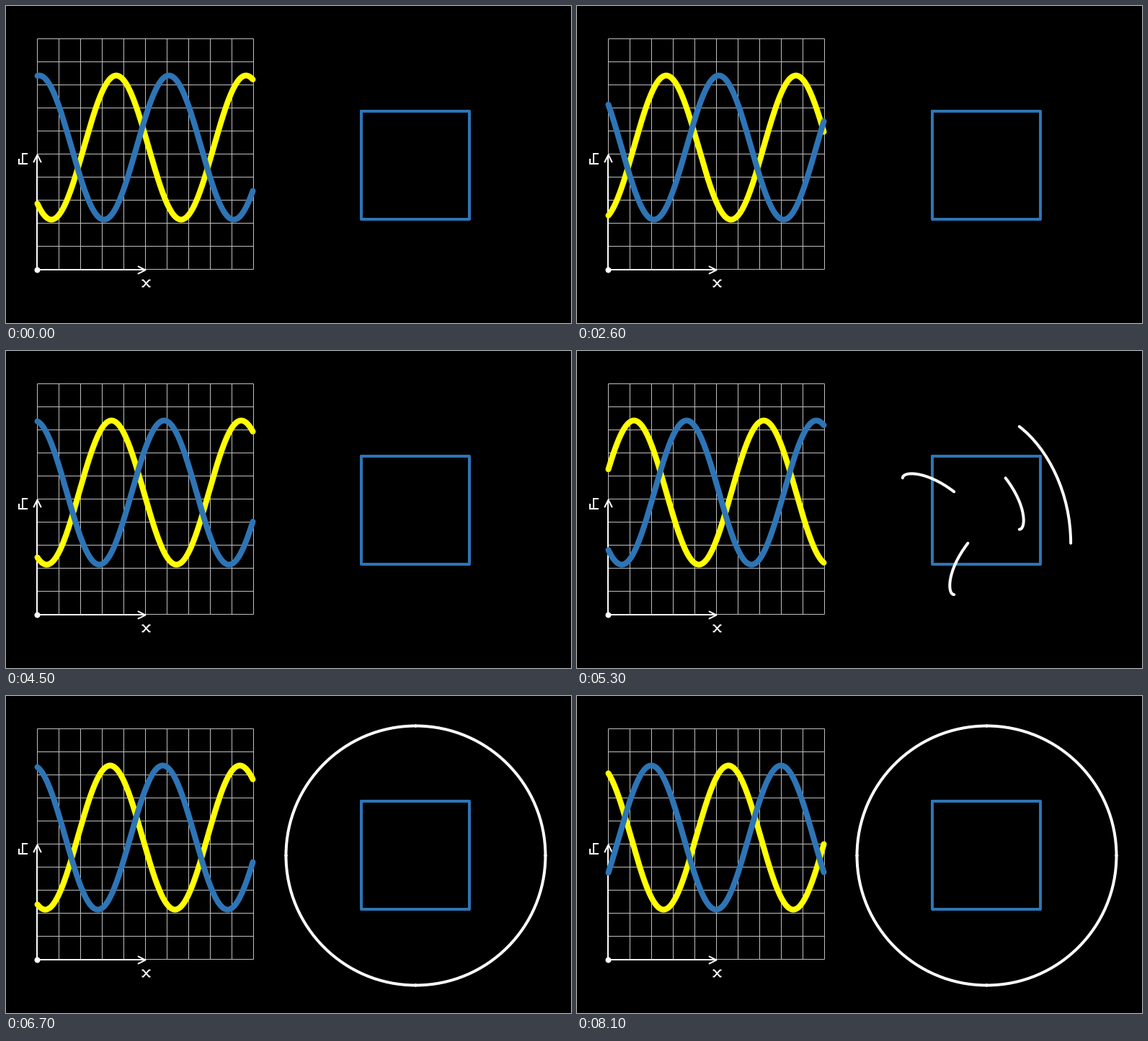
These frames come from a looping animation (784 by 440 pixels, 8200 ms). A matplotlib script:

```python
import numpy as np
import matplotlib.pyplot as plt
from matplotlib.animation import FuncAnimation
from matplotlib.patches import PathPatch, Circle
from matplotlib.path import Path

W, H, DPI = 784, 440, 100
FRAMES, INTERVAL = 82, 100
PX = 72 / DPI
BLUE, YELLOW, WHITE, GREY = "#2e75b6", "#ffff00", "#ffffff", "#bebebe"

fig = plt.figure(figsize=(W / DPI, H / DPI), dpi=DPI, facecolor="black")
ax = fig.add_axes([0, 0, 1, 1])
ax.set_xlim(0, W)
ax.set_ylim(H, 0)
ax.axis("off")


def stroke(xs, ys, color, width, z, cap="round", **kw):
    """Polyline through pixel centres, width in pixels."""
    line, = ax.plot(np.asarray(xs) + 0.5, np.asarray(ys) + 0.5, color=color,
                    lw=width * PX, zorder=z, solid_capstyle=cap, **kw)
    return line


# Grid
LEFT, RIGHT, TOP, BOTTOM = 43, 343, 45, 365
for x in range(LEFT, RIGHT + 1, 30):
    stroke([x, x], [TOP, BOTTOM], GREY, 1, 1, "butt")
for y in range(TOP, BOTTOM + 1, 32):
    stroke([LEFT, RIGHT], [y, y], GREY, 1, 1, "butt")

# Axes with arrows and pixel-style labels
stroke([43, 192], [366, 366], WHITE, 2, 2, "butt")
stroke([43, 43], [366, 207], WHITE, 2, 2, "butt")
stroke([183, 193, 183], [361, 366, 371], WHITE, 2, 2)
stroke([38, 43, 48], [216, 206, 216], WHITE, 2, 2)
ax.add_patch(Circle((43.5, 366.5), 4, color=WHITE, lw=0, zorder=2))

LABELS = [
    ([188, 190, 198, 200], [380, 380, 389, 389]),
    ([200, 198, 190, 188], [380, 380, 389, 389]),
    ([18, 18, 30], [212, 219, 219]),
    ([30, 23, 23], [205, 205, 219]),
]
for xs, ys in LABELS:
    stroke(xs, ys, WHITE, 2, 2, "butt", solid_joinstyle="miter")

# Travelling waves
MID, AMP, WAVELENGTH, LAG = 196, 100, 180, 73
wave_x = np.linspace(LEFT, RIGHT - 1, 301)
yellow = stroke(wave_x, wave_x, YELLOW, 8, 5)
blue = stroke(wave_x, wave_x, BLUE, 8, 6)

# Clock-driven travel to the left, in pixels
TRAVEL_FRAMES = [0, 14, 26, 45, 60, 74, 81]
TRAVEL = [0, 110.2, 209.2, 366.6, 492.8, 604.3, 662.9]


def wave(peak):
    return MID + 0.5 - AMP * np.cos(2 * np.pi * (wave_x - peak) / WAVELENGTH)


# Square whose sides bend into the quarters of a circle
CX, CY, HALF, RADIUS, KAPPA = 568, 221, 75, 180, 0.5523
MORPH_START, MORPH_LENGTH = 46.1, 17.4

stroke(CX + HALF * np.array([-1, 1, 1, -1, -1]),
       CY + HALF * np.array([-1, -1, 1, 1, -1]), BLUE, 4, 3,
       solid_joinstyle="round")

# (quarter start, quarter end, side start, side end) as unit directions
PIECES = np.array([
    [(-1, 0), (0, -1), (-1, -1), (-1, 1)],
    [(0, -1), (1, 0), (1, -1), (1, 1)],
    [(1, 0), (0, 1), (-1, -1), (1, -1)],
    [(0, 1), (-1, 0), (-1, 1), (1, 1)],
], dtype=float)
CODES = [Path.MOVETO] + [Path.CURVE4] * 3


def morph_path(a):
    points = []
    for q0, q1, s0, s1 in PIECES:
        arc = RADIUS * np.array([q0, q0 + KAPPA * q1, q1 + KAPPA * q0, q1])
        side = HALF * np.array([s0, (2 * s0 + s1) / 3, (s0 + 2 * s1) / 3, s1])
        points.append(a * arc + (1 - a) * side)
    return Path(np.concatenate(points) + [CX + 0.5, CY + 0.5], CODES * 4)


morph = PathPatch(morph_path(0), fill=False, edgecolor=WHITE, lw=4 * PX,
                  capstyle="round", joinstyle="round", zorder=4)
ax.add_patch(morph)


def update(n):
    peak = 152.5 - np.interp(n, TRAVEL_FRAMES, TRAVEL)
    yellow.set_ydata(wave(peak))
    blue.set_ydata(wave(peak + LAG))
    a = (n - MORPH_START) / MORPH_LENGTH
    morph.set_visible(a > 0)
    morph.set_path(morph_path(min(max(a, 0), 1))) if hasattr(morph, "set_path") else None
    return yellow, blue, morph


anim = FuncAnimation(fig, update, frames=FRAMES, interval=INTERVAL,
                     repeat=True, repeat_delay=0)
plt.show()
```
